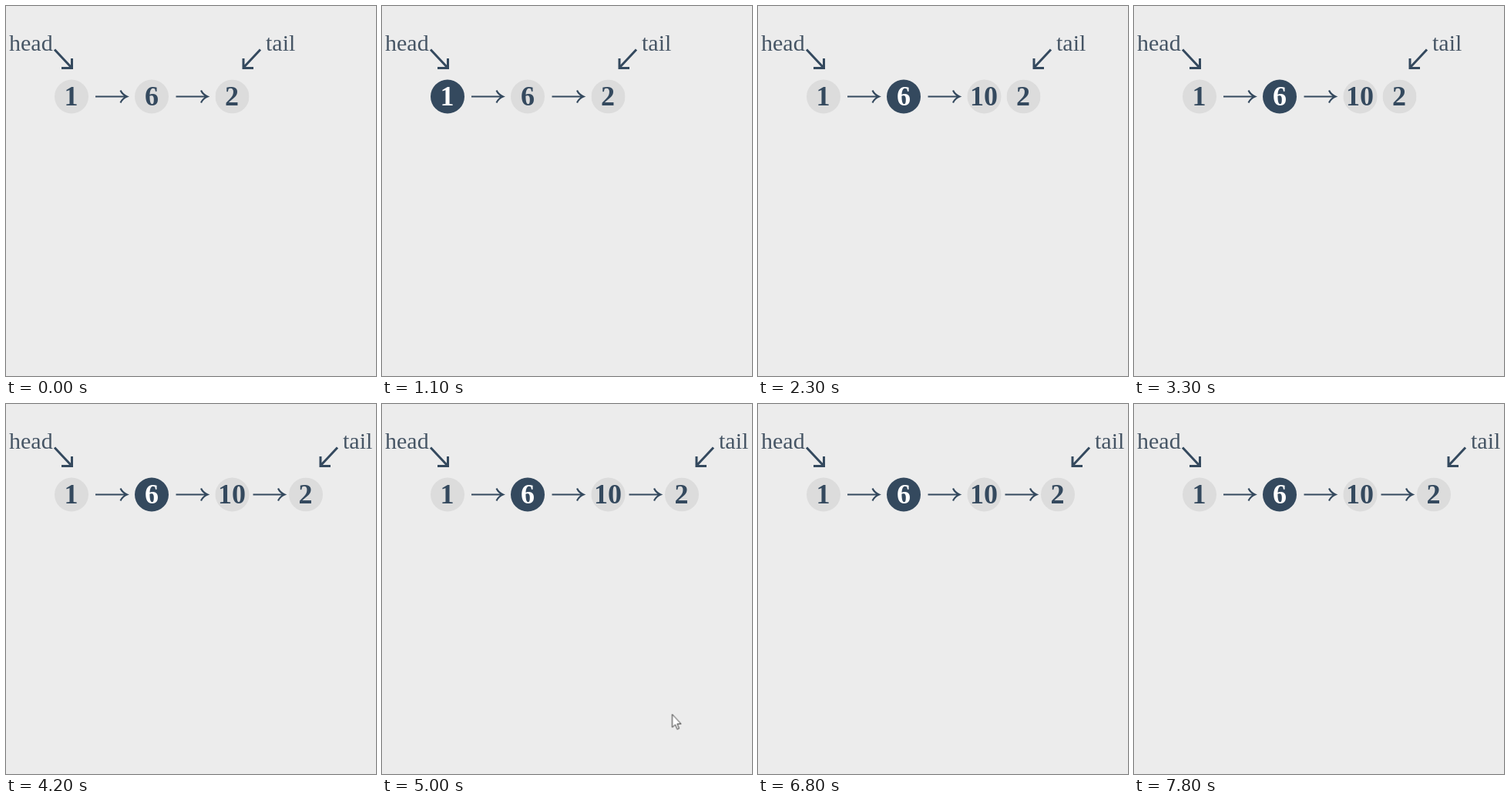
An HTML page for the animation above (8 s loop, 480 px wide and 480 px high).

```html
<!DOCTYPE html>
<html lang="en">
<head>
<meta charset="utf-8">
<title>Linked list insertion</title>
<style>
  html, body { margin: 0; width: 100%; height: 100%; overflow: hidden; background: #ececec; }
  svg { display: block; width: 100vw; height: 100vh; }
  text { font: 30px "Liberation Serif", "Times New Roman", serif; fill: #465565; }
  .node circle { fill: #dcdcdc; }
  .node text { font-size: 36px; font-weight: bold; text-anchor: middle; fill: #34495e; }
  .line { fill: none; stroke: #34495e; stroke-width: 2.2; }
  .pointer { fill: none; stroke: #34495e; stroke-width: 3; }

  .first circle, .first text, .second circle, .second text,
  .last, .tail, .fresh, .link, .cursor { animation: 8s step-end infinite; }

  .first circle { animation-name: first-fill; }
  .first text { animation-name: first-ink; }
  .second circle { animation-name: second-fill; }
  .second text { animation-name: second-ink; }
  .last { animation-name: last; }
  .tail { animation-name: tail; }
  .fresh { animation-name: fresh; }
  .link { animation-name: link; }
  .cursor { animation-name: cursor; }

  @keyframes first-fill { 0%, 15% { fill: #dcdcdc } 2.5% { fill: #34495e } }
  @keyframes first-ink { 0%, 15% { fill: #34495e } 2.5% { fill: #fff } }
  @keyframes second-fill { 0% { fill: #dcdcdc } 15%, 100% { fill: #34495e } }
  @keyframes second-ink { 0% { fill: #34495e } 15%, 100% { fill: #fff } }
  @keyframes last {
    0% { transform: translate(293.5px, 117.5px) }
    27.5% { transform: translate(344.5px, 117.5px) }
    52.5%, 100% { transform: translate(389px, 117.5px) }
  }
  @keyframes tail {
    0% { transform: none }
    27.5% { transform: translateX(50px) }
    52.5%, 100% { transform: translateX(100px) }
  }
  @keyframes fresh { 0% { visibility: hidden } 27.5%, 100% { visibility: visible } }
  @keyframes link { 0% { visibility: hidden } 52.5%, 100% { visibility: visible } }
  @keyframes cursor {
    0%, 67.5%, 100% { visibility: hidden; transform: translate(480px, 370px) }
    58.75% { visibility: visible; transform: translate(440px, 350px) }
    60% { visibility: visible; transform: translate(410px, 378px) }
    61.25% { visibility: visible; transform: translate(385px, 396px) }
    62.5% { visibility: visible; transform: translate(376.5px, 402.5px) }
    65% { visibility: visible; transform: translate(415px, 390px) }
    66.25% { visibility: visible; transform: translate(460px, 376px) }
  }
</style>
</head>
<body>
<svg viewBox="0 0 480 480">
  <defs>
    <path id="arrow" class="line" d="M0 117.5H40M32.5 109.5Q35 115 41 117.5Q35 120 32.5 125.5"/>
  </defs>

  <text x="4" y="57.5">head</text>
  <path class="pointer" d="M63 56.5L85 80M72 80.5H85.5V68"/>

  <g class="tail">
    <text x="337" y="57.5">tail</text>
    <path class="pointer" d="M330 56.5L308 80M321 80.5H308V68"/>
  </g>

  <g class="node first" transform="translate(85 117.5)"><circle r="22"/><text x="-.5" y="11.5">1</text></g>
  <use href="#arrow" x="116"/>
  <g class="node second" transform="translate(189 117.5)"><circle r="22"/><text y="11.5">6</text></g>
  <use href="#arrow" x="220.5"/>
  <g class="node fresh" transform="translate(293.5 117.5)"><circle r="22"/><text x="-.5" y="11.5">10</text></g>
  <use class="link" href="#arrow" x="320.5"/>
  <g class="node last"><circle r="22"/><text x="-.5" y="11.5">2</text></g>

  <path class="cursor" d="M0 0V17L4 13.5L6.5 19.5L9 18.3L6.5 12.5H11.5Z" fill="#fff" stroke="#333" stroke-width="1"/>
</svg>
</body>
</html>
```
